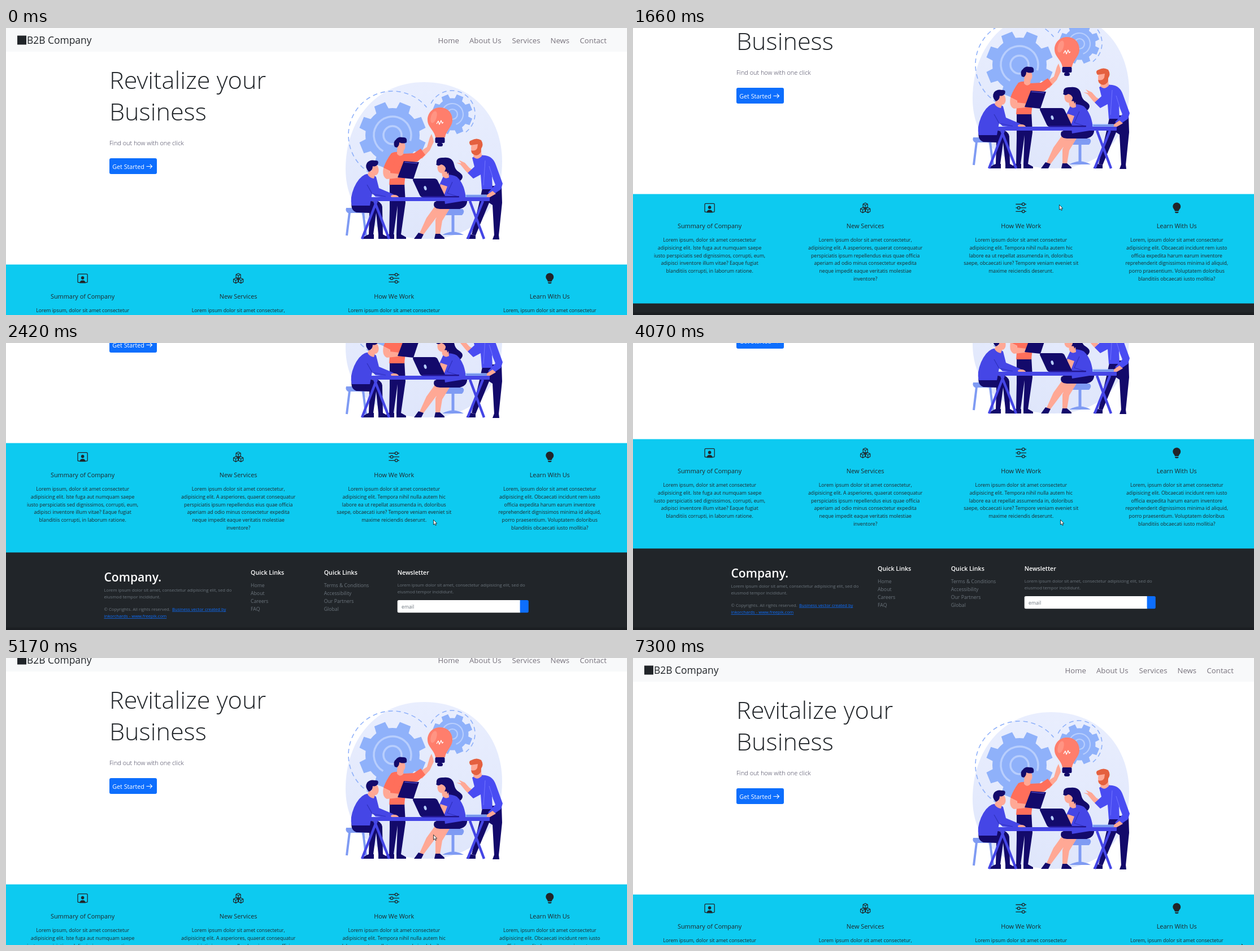
An HTML page with a canvas that plays this animation: 1099x509 px, repeating every 7430 ms.

```html
<!DOCTYPE html>
<html lang="en">
<head>
<meta charset="utf-8">
<title>B2B Company</title>
<style>
html, body { margin: 0; width: 100%; height: 100%; overflow: hidden; background: #fff; }
canvas { display: block; }
</style>
</head>
<body>
<canvas id="stage" width="1099" height="509"></canvas>
<script>
const W = 1099, H = 509, LOOP = 7430;
const ctx = document.getElementById('stage').getContext('2d');

const INK = '#212529', CYAN = '#0dcaf0', BLUE = '#0d6efd', MUTED = '#6c757d';
const NAVY = '#130a6b', SHIRT = '#4546e6', SKIN = '#ffa895', CORAL = '#ff6f5b';
const PALE = '#8fb1fa', STEEL = '#7f9bf3', RUST = '#e4603f';

// time, value rows
const SCROLL = [
  [1100, 0], [1170, 13], [1330, 50.5], [1870, 172], [1990, 172], [2000, 174.2],
  [2340, 230], [2480, 250], [4000, 250], [4070, 249.6], [4280, 192], [4410, 192],
  [4480, 186], [4750, 126.6], [5170, 18], [5240, 14], [5510, 0]
];
const POINTER = [
  [70, 1022, 489], [250, 925, 425], [450, 810, 355], [630, 741, 318], [770, 754, 313],
  [1870, 754, 313], [2000, 756, 313], [5700, 756, 313], [5770, 880, 345], [5840, 1031, 396]
];

function at(rows, t, k) {
  if (t <= rows[0][0]) return rows[0][k];
  for (let i = 1; i < rows.length; i++) {
    const a = rows[i - 1], b = rows[i];
    if (t < b[0]) return a[k] + (b[k] - a[k]) * (t - a[0]) / (b[0] - a[0]);
  }
  return rows[rows.length - 1][k];
}

function text(str, x, y, size, color = INK, weight = 400, align = 'left') {
  ctx.font = `${weight} ${size}px "Open Sans", "Noto Sans", sans-serif`;
  ctx.fillStyle = color;
  ctx.textAlign = align;
  ctx.fillText(str, x, y);
}
function lines(list, x, y, step, ...style) {
  list.forEach((s, i) => text(s, x, y + i * step, ...style));
}
function rect(x, y, w, h, color, r = 0) {
  ctx.fillStyle = color;
  ctx.beginPath();
  ctx.roundRect(x, y, w, h, r);
  ctx.fill();
}
function fill(color, d) {
  ctx.fillStyle = color;
  ctx.fill(new Path2D(d));
}
function line(color, width, d) {
  ctx.strokeStyle = color;
  ctx.lineWidth = width;
  ctx.stroke(new Path2D(d));
}
function ring(x, y, r, color, width, from = 0, to = Math.PI * 2) {
  ctx.strokeStyle = color;
  ctx.lineWidth = width;
  ctx.beginPath();
  ctx.arc(x, y, r, from, to);
  ctx.stroke();
}
function oval(x, y, rx, ry, color, turn = 0) {
  ctx.fillStyle = color;
  ctx.beginPath();
  ctx.ellipse(x, y, rx, ry, turn, 0, Math.PI * 2);
  ctx.fill();
}

function gear(x, y, outer, inner) {
  const teeth = 8, step = Math.PI * 2 / teeth;
  ctx.fillStyle = PALE;
  ctx.beginPath();
  for (let i = 0; i < teeth; i++) {
    const a = (i + .5) * step;
    for (const [f, r] of [[-.31, inner], [-.22, outer], [.22, outer], [.31, inner]]) {
      ctx.lineTo(x + r * Math.cos(a + f * step), y + r * Math.sin(a + f * step));
    }
    ctx.arc(x, y, inner, a + .31 * step, a + .69 * step);
  }
  ctx.fill();
}

function backdrop() {
  const g = ctx.createLinearGradient(0, 96, 0, 374);
  g.addColorStop(0, '#e9eefe');
  g.addColorStop(1, '#dfe6fb');
  fill(g, 'M740 96C828 96 878 160 878 237C878 322 828 374 745 374C657 374 601 328 601 250C601 166 652 96 740 96Z');
  gear(684, 190, 60, 48);
  ring(684, 190, 33, '#b8cefd', 3.5, 2.1, 6.6);
  ring(684, 190, 16, '#b8cefd', 3.5);
  gear(790, 153, 36, 28.5);
  ring(790, 153, 19, '#b8cefd', 2.2, 3, 7.5);
  ring(790, 153, 9, '#b8cefd', 2.2);
  ctx.setLineDash([8, 6]);
  ring(684, 190, 78, PALE, 1.6, 2.1, 5.6);
  ring(789, 152, 41, PALE, 1.6, 3.6, 7.2);
  ctx.setLineDash([]);
}

function bulb() {
  fill('#ff7e6c', 'M768 141C782 141 790 151 790 163C790 176 779 181 777 194H760C758 181 746 176 746 163C746 151 755 141 768 141Z');
  oval(757, 158, 5, 11, '#ff9483', .3);
  line('#fff', 1.3, 'M762 170l3-5 2 6 3-7 2 5 2-2');
  rect(759.5, 194, 17, 10, NAVY, 2);
  rect(763, 204, 10, 6, NAVY, 3);
}

function presenter() {
  fill(NAVY, 'M679 274H705L707 310L699 366H691L693 315L686 366H678L679 320Z');
  fill(NAVY, 'M677 366H687V374H670Q671 369 677 366ZM691 366H699L708 371V374H691Z');
  fill(SKIN, 'M729 222L745 211L750 194L753 188L756 196L757 202L750 217L736 232Z');
  fill(CORAL, 'M682 222Q692 217 704 223L722 222L734 214L742 225L728 237L709 239L705 278H678L680 252Z');
  fill(CORAL, 'M682 222Q673 234 668 248L680 254L688 238Z');
  fill(SKIN, 'M668 248L680 254L679 257L696 259L694 266L674 268Q665 264 668 248Z');
  fill(SKIN, 'M692 215H704L703 224Q697 230 692 223Z');
  oval(699, 209, 7.5, 10, SKIN, -.15);
  fill(NAVY, 'M688 211Q684 202 690 198Q694 192 702 194Q711 193 709 203Q703 206 696 203Q696 209 692 212Z');
  fill(NAVY, 'M704 236L731 238L721 268L693 265Z');
  line('#625adf', 1, 'M705 238L728 240');
}

function listener() {
  fill(STEEL, 'M602 319H637Q641 324 636 328H605Q600 325 602 319Z');
  line(STEEL, 4, 'M608 327L603 368M632 327L637 368');
  fill(NAVY, 'M612 308L643 306Q658 309 656 321L650 366H642L643 328L620 327Q609 323 612 308Z');
  fill(NAVY, 'M635 308L658 307Q667 311 666 322L667 366H659L655 327L637 323Z');
  fill(NAVY, 'M642 366H651V374H629Q632 370 642 366ZM659 366H667L676 371V374H659Z');
  fill(SHIRT, 'M635 260Q645 256 655 264L660 284L686 295L682 302L654 299L648 293L644 315H612Q608 302 616 283Q624 265 635 260Z');
  line('#2f31bd', 1.2, 'M639 278L648 294L672 299');
  fill(SKIN, 'M643 252L654 258L651 267Q644 266 640 260Z');
  oval(653, 251, 6.5, 10, SKIN, -.15);
  fill(NAVY, 'M642 255Q634 247 639 239Q644 233 653 235Q661 234 658 242Q653 247 649 245Q649 253 642 255Z');
  oval(688, 299, 7, 3, SKIN, .15);
}

function typist() {
  fill(STEEL, 'M774 321H808Q813 326 807 332H777Q770 328 774 321Z');
  line(STEEL, 5, 'M791 331V362');
  fill(STEEL, 'M772 367Q791 356 810 367Z');
  fill(SKIN, 'M762 312L779 318L760 338L739 366H731L744 337ZM772 316H788L772 342L768 366H760L760 340Z');
  fill(NAVY, 'M730 363L739 366L735 374H722ZM760 365H768L776 372V374H758Z');
  fill(NAVY, 'M758 309Q775 298 816 303Q818 317 803 321H768Q754 320 758 309Z');
  fill(NAVY, 'M762 241Q760 229 774 230Q790 228 793 242Q795 252 801 255Q815 264 801 273Q786 277 782 266Z');
  fill(SHIRT, 'M774 263Q784 257 798 264Q813 278 814 306L777 312L775 295L762 293L768 276Z');
  fill(SKIN, 'M769 277L781 281L774 300L757 302L765 291ZM771 254L783 255L784 265Q777 269 772 262Z');
  oval(771, 247, 7.5, 10.5, SKIN, .1);
  fill(NAVY, 'M761 242Q766 230 779 234L789 248L781 259Q779 243 770 242Q765 246 761 242Z');
  line('#3032bd', 1.2, 'M790 273L781 293L800 299');
}

function leader() {
  fill(NAVY, 'M844 280H877L878 310L872 368H864L861 314L855 310L831 368L824 366L837 312Z');
  fill(NAVY, 'M823 366L831 368V374H815Q815 369 823 366ZM864 367H872L873 375H861Z');
  fill(SKIN, 'M804 242L797 239L806 240L801 234L812 239L820 248L831 255L826 266L813 253Z');
  fill('#494cf2', 'M825 230Q835 224 848 226Q862 228 867 243L879 276L876 286L860 297L853 292L866 278L860 263L861 286H842L840 260L827 267L817 257L829 246Z');
  line('#7174ff', 1, 'M855 245L862 267M848 235L845 279');
  fill(SKIN, 'M861 289L867 294L853 302L845 300ZM829 218H841L842 227Q834 236 827 228Z');
  oval(831, 212, 8, 12, SKIN, .1);
  fill(RUST, 'M822 208Q817 201 824 199Q833 194 841 199Q846 207 841 214Q842 224 832 226Q824 225 823 217Q831 219 834 213L835 206Z');
}

function table() {
  line(SHIRT, 4.5, 'M656 307L630 374M652 307L678 374M844 307L817 374M821 307L846 374');
  rect(638, 300, 218, 7, SHIRT, 1);
  rect(813, 295.5, 38, 4.5, PALE, 1);
  line('#4e65d2', 1, 'M815 298H851');
  fill(NAVY, 'M722 267H758Q762 267 764 271L778 300H737Q734 300 732 296L720 270Q720 267 722 267Z');
  rect(737, 298, 65, 2.5, '#231693', 1);
  oval(742, 284, 2.3, 4, '#b8cefd', -.3);
}

function artwork() {
  ctx.lineCap = 'butt';
  ctx.lineJoin = 'round';
  backdrop();
  presenter();
  bulb();
  listener();
  typist();
  leader();
  table();
}

function cube(x, y) {
  line(INK, 1, `M${x} ${y - 3.9}l3.5 1.7v4.3l-3.5 1.9l-3.5-1.9v-4.3zM${x - 3.5} ${y - 2.2}l3.5 1.8l3.5-1.8M${x} ${y - .4}v4.4`);
}
const icons = [
  () => {
    line(INK, 1.1, 'M4 14.5H2Q.6 14.5.6 13V3Q.6 1.5 2 1.5H14Q15.4 1.5 15.4 3V13Q15.4 14.5 14 14.5H12');
    oval(8, 7.3, 2.4, 2.5, INK);
    fill(INK, 'M3.3 15.4Q4 11 8 11T12.7 15.4Z');
  },
  () => { cube(8, 4.4); cube(4.1, 11.5); cube(11.9, 11.5); },
  () => {
    line(INK, 1.1, 'M0 2.5H9.3M13.7 2.5H16M0 8H2.3M6.7 8H16M0 13.5H9.3M13.7 13.5H16');
    for (const [x, y] of [[11.5, 2.5], [4.5, 8], [11.5, 13.5]]) ring(x, y, 2, INK, 1.1);
  },
  () => {
    fill(INK, 'M2 6A6 6 0 1 1 12.2 10.3Q11.7 10.8 11 12.7L10.5 13H5.5L5 12.7Q4.3 10.8 3.8 10.3A6 6 0 0 1 2 6Z');
    fill(INK, 'M5 14.5L5.5 14H10.5L11 14.5L10.3 15.5Q10 16 9.4 16H6.6Q6 16 5.7 15.5Z');
  }
];

const CARDS = [
  ['Summary of Company', 'Lorem ipsum, dolor sit amet consectetur', 'adipisicing elit. Iste fuga aut numquam saepe',
    'iusto perspiciatis sed dignissimos, corrupti, eum,', 'adipisci inventore illum vitae? Eaque fugiat',
    'blanditiis corrupti, in laborum ratione.'],
  ['New Services', 'Lorem ipsum dolor sit amet consectetur,', 'adipisicing elit. A asperiores, quaerat consequatur',
    'perspiciatis ipsum repellendus eius quae officia', 'aperiam ad odio minus consectetur expedita',
    'neque impedit eaque veritatis molestiae', 'inventore?'],
  ['How We Work', 'Lorem ipsum dolor sit amet consectetur', 'adipisicing elit. Tempora nihil nulla autem hic',
    'labore ea ut repellat assumenda in, doloribus', 'saepe, obcaecati iure? Tempore veniam eveniet sit',
    'maxime reiciendis deserunt.'],
  ['Learn With Us', 'Lorem, ipsum dolor sit amet consectetur', 'adipisicing elit. Obcaecati incidunt rem iusto',
    'officia expedita harum earum inventore', 'reprehenderit dignissimos minima id aliquid,',
    'porro praesentium. Voluptatem doloribus', 'blanditiis obcaecati iusto mollitia?']
];

function navbar() {
  rect(0, 0, W, 42, '#f8f9fa');
  rect(20, 13.5, 16, 16, INK);
  text('B2B Company', 37, 28, 17.4);
  const links = { Home: 764.5, 'About Us': 820, Services: 895.5, News: 963.5, Contact: 1015.5 };
  for (const name in links) text(name, links[name], 26.6, 13.2, '#76717b');
}

function hero() {
  lines(['Revitalize your', 'Business'], 183, 107.8, 55.8, 43.2, INK, 300);
  text('Find out how with one click', 183, 208.3, 10.9, '#3f3d56', 300);
  rect(183, 231, 84, 28, BLUE, 3);
  text('Get Started', 188.3, 249.6, 10.7, '#fff', 500);
  line('#fff', 1.1, 'M248.5 245.5H258.5M254.8 241.8L258.5 245.5L254.8 249.2');
  artwork();
}

function cards() {
  rect(0, 419.4, W, 195, CYAN);
  CARDS.forEach(([title, ...body], i) => {
    const x = 135.6 + i * 275.55;
    ctx.save();
    ctx.translate(x - 9.3, 434.6);
    ctx.scale(1.1625, 1.1625);
    icons[i]();
    ctx.restore();
    text(title, x, 479.7, 10.9, INK, 400, 'center');
    lines(body, x, 503.6, 13.95, 8.72, INK, 400, 'center');
  });
}

function footer() {
  const blurb = ['Lorem ipsum dolor sit amet, consectetur adipisicing elit, sed do', 'eiusmod tempor incididunt.'];
  rect(0, 613.4, W, 150, INK);
  text('Company.', 173.5, 664.5, 21.1, '#fff', 600);
  lines(blurb, 173.5, 683.2, 12, 7.69, MUTED);
  text('© Copyrights. All rights reserved.', 173.5, 716.8, 7.69, MUTED);
  const link = [['Business vector created by', 294, 716.8], ['inkorchards - www.freepik.com', 173.5, 728.9]];
  for (const [s, x, y] of link) {
    text(s, x, y, 7.69, BLUE);
    rect(x, y + 1, ctx.measureText(s).width, .8, BLUE);
  }
  text('Quick Links', 433, 652.8, 10.7, '#fff', 600);
  lines(['Home', 'About', 'Careers', 'FAQ'], 433, 675, 13.95, 8.72, MUTED);
  text('Quick Links', 562.7, 652.8, 10.7, '#fff', 600);
  lines(['Terms & Conditions', 'Accessibility', 'Our Partners', 'Global'], 562.7, 675, 13.95, 8.72, MUTED);
  text('Newsletter', 692.7, 652.8, 10.6, '#fff', 600);
  lines(blurb, 692.7, 674, 12, 7.69, MUTED);
  rect(692.7, 698, 217.5, 22.3, '#fff', [2.5, 0, 0, 2.5]);
  text('email', 700, 712.6, 8.72, MUTED);
  rect(909.6, 698, 15.2, 22.3, BLUE, [0, 2.5, 2.5, 0]);
}

function pointer(x, y) {
  ctx.save();
  ctx.translate(x, y);
  const d = 'M.5.5V9.3L2.5 7.5L4 10.6L5.4 10L4 7H6.7Z';
  fill('#fff', d);
  line('#111', .8, d);
  ctx.restore();
}

function draw(t) {
  const y = Math.round(at(SCROLL, t, 1));
  rect(0, 0, W, H, '#fff');
  ctx.save();
  ctx.translate(0, -y);
  navbar();
  hero();
  cards();
  footer();
  ctx.restore();
  if (y > 110) rect(0, 504.5, W, 5, 'rgba(0,0,0,.18)');
  if (t >= 70 && t < 5910) pointer(at(POINTER, t, 1), at(POINTER, t, 2));
  else if (t >= 7300) pointer(1077, 507);
  else if (t >= 7170) pointer(1067, 497);
}

const start = performance.now();
function tick() {
  draw((performance.now() - start) % LOOP);
  requestAnimationFrame(tick);
}
tick();
</script>
</body>
</html>
```
